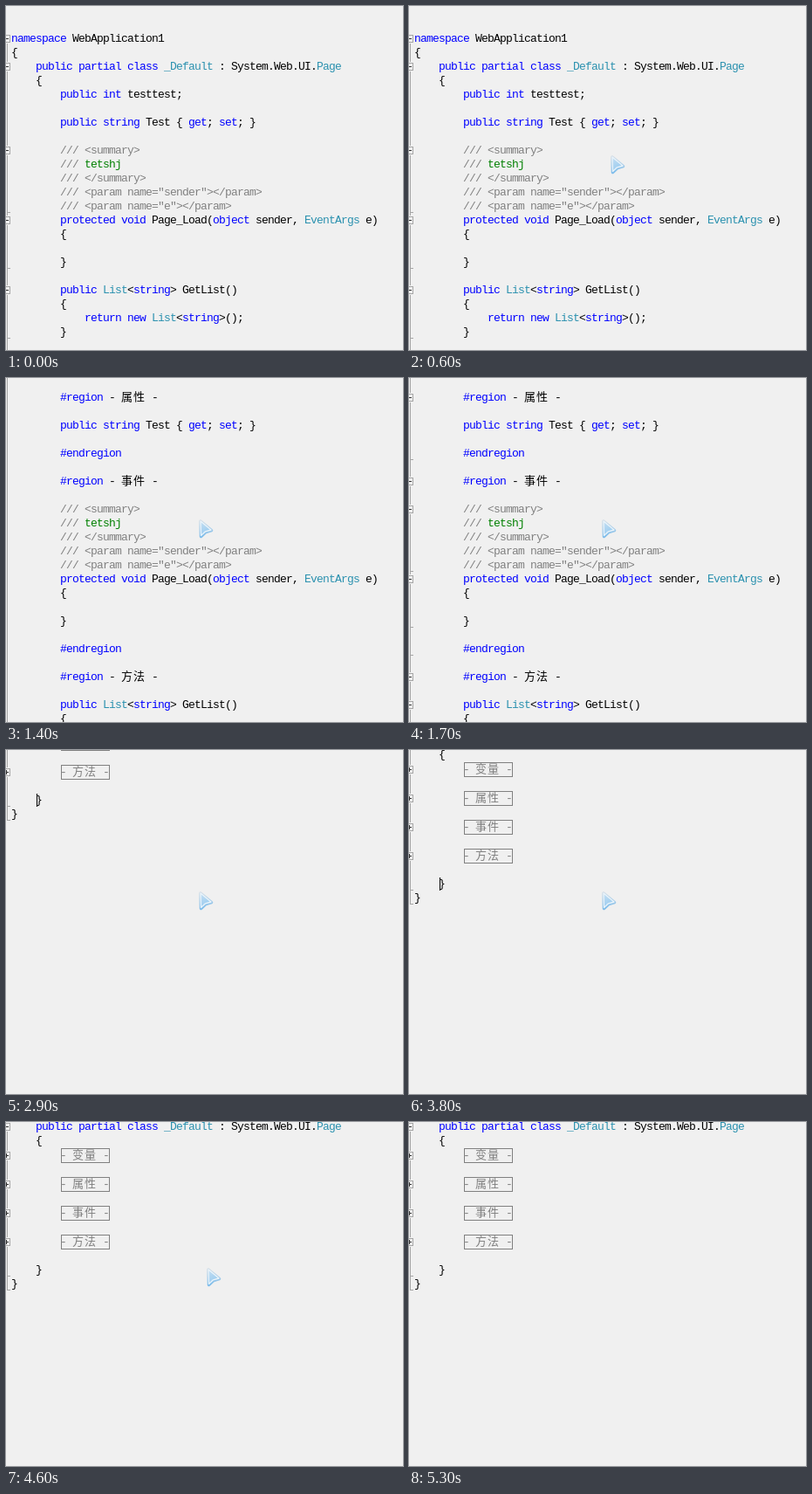
Write an HTML page that moves like this. It is 455 by 394 pixels and loops after 5.6 s.

```html
<!DOCTYPE html>
<html lang="en">
<head>
<meta charset="utf-8">
<title>Code regions</title>
<style>
  html, body { margin: 0; width: 100%; height: 100%; overflow: hidden; background: #f0f0f0; }
  #stage { position: relative; width: 455px; height: 394px; overflow: hidden; }
  .scene, .scene > *, #pointer { position: absolute; }
  .scene {
    left: 0; top: 0; width: 455px; white-space: pre; color: #000;
    font: 13px/16px "Liberation Mono", monospace; letter-spacing: calc(7px - 1ch);
  }
  .line { height: 16px; text-indent: -1px; }
  .key { color: #00f; }
  .type { color: #2b91af; }
  .comment, .fold { color: #808080; }
  .note { color: #008000; }
  .cjk { font-family: "Noto Sans CJK SC", "Noto Sans CJK", sans-serif; letter-spacing: 1px; line-height: 0; }
  .fold { box-sizing: border-box; width: 56px; height: 17px; border: 1px solid #808080; text-indent: -2px; line-height: 15px; }
  .rail { left: 1px; width: 1px; background: #a5a5a5; }
  .tick { left: 1px; width: 4px; height: 1px; background: #a5a5a5; }
  .toggle {
    left: -4px; width: 7px; height: 7px; border: 1px solid #a5a5a5;
    background: #f0f0f0; box-shadow: 0 0 0 1px #f0f0f0;
  }
  .toggle::before, .plus::after { content: ""; position: absolute; left: 1px; top: 3px; width: 5px; height: 1px; background: #333; }
  .plus::after { transform: rotate(90deg); }
  .plain .toggle, .plain .tick { display: none; }
  #caret { left: 35px; width: 1px; height: 15px; background: #000; }
  #pointer { left: 0; top: 0; width: 18px; height: 24px; }
</style>
</head>
<body>
<div id="stage">
  <svg id="pointer" viewBox="0 0 18 24">
    <defs>
      <linearGradient id="ice" x1="0" y1="0" x2=".5" y2="1">
        <stop offset="0" stop-color="#c6dff2"/>
        <stop offset="1" stop-color="#98cbf0"/>
      </linearGradient>
      <linearGradient id="rim" x1="0" y1="0" x2="0" y2="1">
        <stop offset="0" stop-color="#d0dce6"/>
        <stop offset="1" stop-color="#7dbcea"/>
      </linearGradient>
    </defs>
    <g stroke-linejoin="round">
      <path d="M3 3 L15.5 13.5 L9 15.5 L3.5 20.5 Z" fill="url(#rim)" stroke="url(#rim)" stroke-width="3.5"/>
      <path d="M3 3 L15 13 L8.5 14.8 L3.5 19.5 Z" fill="url(#ice)" stroke="#eaf4fb" stroke-width="1.3"/>
    </g>
  </svg>
</div>
<script>
const LOOP = 5600, STAGE_HEIGHT = 394;
const stage = document.getElementById('stage');
const pointer = document.getElementById('pointer');

// The first character of each line is its gutter mark: - open, + folded, ] block end.
const method = `\
-        /// <summary>
         /// tetshj
         /// </summary>
         /// <param name="sender"></param>
]        /// <param name="e"></param>
-        protected void Page_Load(object sender, EventArgs e)
         {

]        }
`;
const getList = `\
-        public List<string> GetList()
         {
             return new List<string>();
]        }`;
const classHead = `\
-    public partial class _Default : System.Web.UI.Page
     {
`;
const flatCode = `\
-namespace WebApplication1
 {
${classHead}\
         public int testtest;

         public string Test { get; set; }

${method}
${getList}`;
const regionCode = `\
-        #region - 属性 -

         public string Test { get; set; }

]        #endregion

-        #region - 事件 -

${method}
]        #endregion

-        #region - 方法 -

${getList}`;
const foldedCode = classHead +
  ['变量', '属性', '事件', '方法'].map(name => `+        - ${name} -\n\n`).join('') +
  ']    }\n]}';

const span = (cls, text) => `<span class="${cls}">${text}</span>`;
const TOKENS = new RegExp('(///.*)' +
  '|(#region|#endregion|\\b(?:namespace|public|partial|class|int|string|get|set|protected|void|object|return|new)\\b)' +
  '|\\b(_Default|Page|EventArgs|List)\\b|([\\u4e00-\\u9fff]+)', 'g');

function paint(code) {
  return code.replace(/</g, '&lt;').replace(TOKENS, (all, comment, key, type) =>
    comment ? span('comment', comment.replace('tetshj', span('note', 'tetshj'))) :
    span(key ? 'key' : type ? 'type' : 'cjk', all));
}

function buildScene(code, top, railTop, railBottom) {
  const box = (cls, y, html = '', style = '') =>
    `<div class="${cls}" style="top:${y}px;${style}">${html}</div>`;
  let y = top;
  let html = box('rail', railTop, '', `height:${railBottom - railTop}px`);
  for (const line of code.split('\n')) {
    const mark = line[0], text = line.slice(1), folded = mark === '+';
    const body = text.trimStart();
    const x = 7 + 7 * (text.length - body.length);
    html += box(folded ? 'fold' : 'line', y, paint(body), `left:${x}px`);
    if (mark === '-') html += box('toggle', y + 3);
    if (folded) html += box('toggle plus', y + 4);
    if (mark === ']') html += box('tick', y + 14);
    y += folded ? 17 : 16;
  }
  const scene = document.createElement('div');
  scene.className = 'scene';
  scene.innerHTML = html;
  stage.insertBefore(scene, pointer);
  return scene;
}

const flat = buildScene(flatCode, 30, 37, STAGE_HEIGHT);
const regions = buildScene(regionCode, 15, 0, STAGE_HEIGHT);
const folded = buildScene(foldedCode, 0, -30, 195);
folded.insertAdjacentHTML('beforeend', '<div id="caret" style="top:164px"></div>');
const caret = document.getElementById('caret');

// Held pointer positions: start time, then x and y (none while hidden).
const pointerPath = [
  [0], [100, 435, 175], [200, 375, 171], [300, 262, 163], [400, 154, 157],
  [500, 204, 165], [600, 230, 170], [1100, 228, 168], [1200, 223, 164],
  [1300, 220, 161], [4600, 229, 166], [4700, 266, 184], [4800]
];
const foldedScroll = [[0, -114], [3800, -18], [4200, -2]];
const caretBlink = [[0, true], [3400, false], [3800, true], [4300, false], [4800, true], [5300, false]];

const held = (track, time) => track.filter(([start]) => start <= time).pop().slice(1);
const show = (element, on) => { element.style.display = on ? '' : 'none'; };
const move = (element, x, y) => { element.style.transform = `translate(${x}px, ${y}px)`; };

function render(now) {
  const time = now % LOOP;
  show(flat, time < 1400);
  show(regions, time >= 1400 && time < 2900);
  show(folded, time >= 2900);
  regions.classList.toggle('plain', time < 1700);
  move(folded, 0, held(foldedScroll, time)[0]);
  show(caret, held(caretBlink, time)[0]);

  const [x, y] = held(pointerPath, time);
  show(pointer, x !== undefined);
  if (x !== undefined) move(pointer, x, y);
}

const start = performance.now();
function tick() {
  render(performance.now() - start);
  requestAnimationFrame(tick);
}
tick();
</script>
</body>
</html>
```
